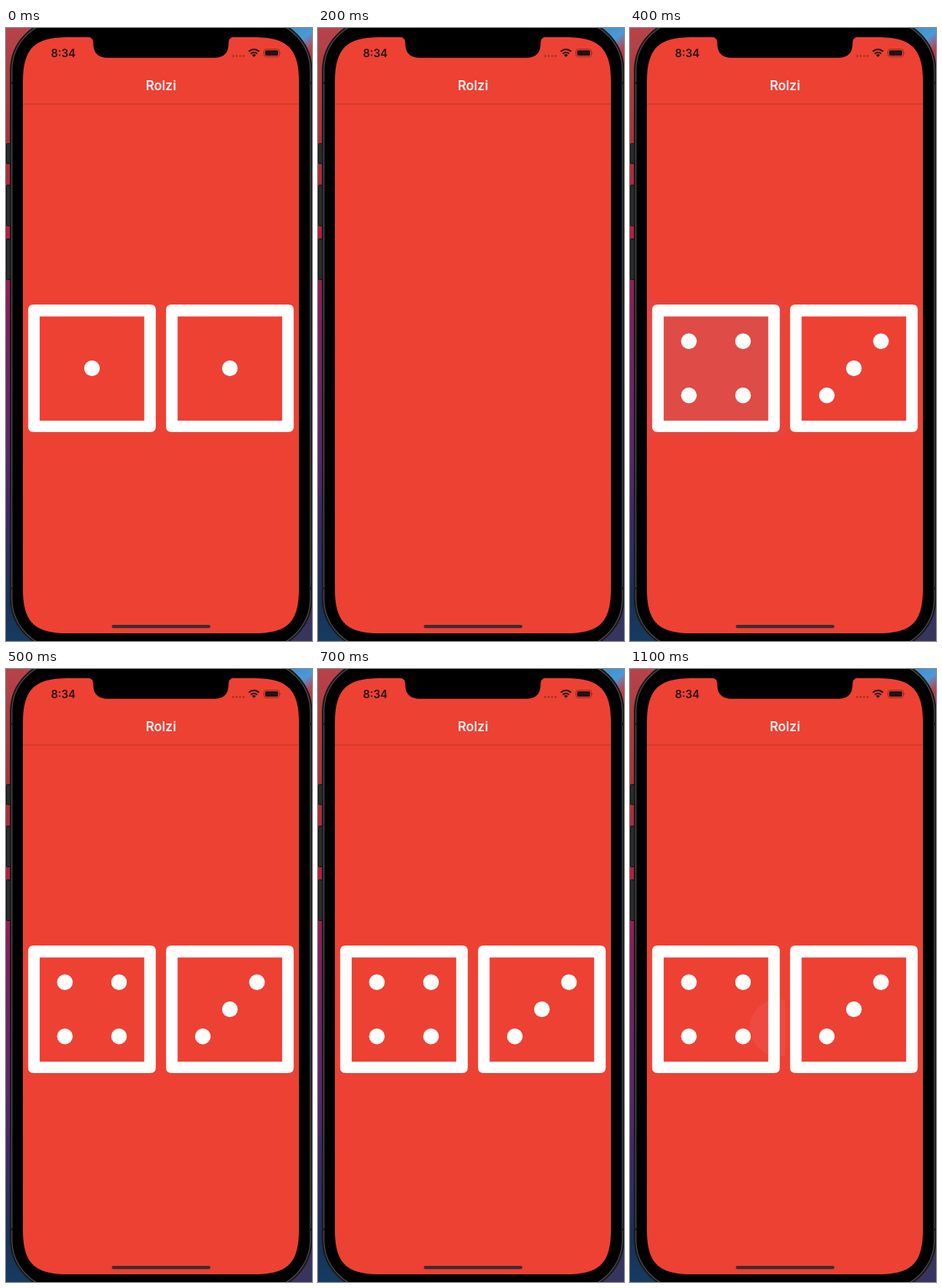
An HTML page for the animation above (1.2 s loop, 398 by 798 pixels).

```html
<!DOCTYPE html>
<html lang="en">
<head>
<meta charset="utf-8">
<title>Dice roller</title>
<style>
  html, body { margin: 0; width: 100%; height: 100%; overflow: hidden; background: #000; }
  svg { display: block; width: 398px; height: 798px; }
  text { font-family: Inter, "Liberation Sans", sans-serif; font-weight: 600; text-anchor: middle; }
</style>
</head>
<body>
<svg viewBox="0 0 398 798">
  <defs>
    <linearGradient id="wall" x2="0" y2="1">
      <stop offset="0" stop-color="#b8434b"/>
      <stop offset=".1" stop-color="#a93b3b"/>
      <stop offset=".2" stop-color="#a8303a"/>
      <stop offset=".34" stop-color="#b01f3b"/>
      <stop offset=".45" stop-color="#851f59"/>
      <stop offset=".68" stop-color="#5b2769"/>
      <stop offset=".82" stop-color="#372a60"/>
      <stop offset=".93" stop-color="#1c3059"/>
      <stop offset="1" stop-color="#153b60"/>
    </linearGradient>
    <linearGradient id="sky" x2=".6" y2="1">
      <stop offset="0" stop-color="#3a86c4"/>
      <stop offset=".5" stop-color="#4a9ad8"/>
      <stop offset=".72" stop-color="#b5485c"/>
      <stop offset="1" stop-color="#b02c3c"/>
    </linearGradient>
    <clipPath id="tapArea"><rect x="22" y="353" width="180" height="180"/></clipPath>
  </defs>

  <!-- wallpaper and phone body -->
  <rect width="398" height="798" fill="url(#wall)"/>
  <rect x="350" width="48" height="60" fill="url(#sky)"/>
  <rect x="350" y="730" width="48" height="68" fill="#37345f"/>
  <g id="keys" fill="#2b2a2c" stroke="#111"></g>
  <rect x="6" y="-11.5" width="391.5" height="821" rx="67" fill="#000" stroke="#1b1a1c" stroke-width="2"/>
  <rect x="7.7" y="-9.8" width="388.1" height="817.6" rx="65.3" fill="none" stroke="#4c4a4c" stroke-width="1.3"/>
  <path d="M5 71.5h4M394 71.5h4M5 729.5h4M394 729.5h4" stroke="#1a1a1b" stroke-width="3"/>

  <!-- screen with continuous corners -->
  <path fill="#ed4133" d="M80 12H323C366.200 12 381 26.800 381 70V730C381 773.200 366.200 788 323 788H80C36.800 788 22 773.200 22 730V70C22 26.800 36.800 12 80 12Z"/>
  <path d="M22 99h359" stroke="#cf392e" stroke-width="1.6"/>
  <path d="M106 11.5Q113.5 12 113.5 19V21Q114 38.700 132 38.700H271Q289 38.700 289.500 21V19Q289.500 12 297 11.500Z"/>

  <!-- status bar -->
  <g fill="#25100f">
    <text x="74.5" y="37.500" font-size="14.200">8:34</text>
    <g id="signal" opacity=".3"></g>
    <path d="M322.500 37.800L319.900 35.200Q322.500 33 325.100 35.200Z"/>
    <g fill="none" stroke="#25100f" stroke-width="1.9">
      <path d="M318.300 33.400Q322.500 29.900 326.700 33.400M315.700 30.600Q322.500 25 329.300 30.600"/>
    </g>
    <rect x="335.500" y="27.500" width="20" height="10" rx="3" fill="none" stroke="#25100f" stroke-opacity=".45"/>
    <rect x="337" y="29" width="17" height="7" rx="1.700"/>
    <path d="M356.700 30.800q1.500 1.700 0 3.400z" opacity=".6"/>
  </g>
  <text x="201.500" y="81" font-size="17" fill="#fff5f3">Rolzi</text>

  <!-- touch feedback -->
  <g id="press">
    <rect x="22" y="353" width="180" height="180" rx="2"/>
    <rect x="43" y="375" width="138" height="137"/>
  </g>
  <g id="splash" clip-path="url(#tapArea)">
    <circle cx="193" cy="467" r="37" fill="#ee4a40"/>
  </g>

  <g id="dice" fill="#fff"></g>
  <rect x="137.500" y="777" width="128.500" height="4.200" rx="2.100" fill="#3c2c31"/>
</svg>
<script>
const NS = 'http://www.w3.org/2000/svg';
const $ = id => document.getElementById(id);

function add(parent, tag, attrs) {
  const el = document.createElementNS(NS, tag);
  for (const key in attrs) el.setAttribute(key, attrs[key]);
  return parent.appendChild(el);
}

for (const [y, height] of [[150.5, 26], [204.5, 53], [274.5, 53]])
  add($('keys'), 'rect', { x: 0.5, y, width: 8, height, rx: 1 });
for (let i = 0; i < 4; i++)
  add($('signal'), 'circle', { cx: 295.5 + i * 4.5, cy: 36.5, r: 1.4 });

// Pip positions in steps from the die centre
const PIPS = {
  1: [[0, 0]],
  3: [[1, -1], [0, 0], [-1, 1]],
  4: [[-1, -1], [1, -1], [-1, 1], [1, 1]]
};

function makeDie(x, value) {
  const die = add($('dice'), 'g', { transform: `translate(${x} 443)` });
  add(die, 'path', {
    'fill-rule': 'evenodd',
    d: 'M-76-83H76Q83-83 83-76V76Q83 83 76 83H-76Q-83 83-83 76V-76Q-83-83-76-83Z' +
       'M-68-67.500V68.200H68V-67.500Z'
  });
  for (const [px, py] of PIPS[value])
    add(die, 'circle', { cx: px * 35.2, cy: py * 35.2, r: 10.2 });
  return die;
}

const makePair = (left, right) => [makeDie(111.8, left), makeDie(291.2, right)];
const pairs = { ones: makePair(1, 1), rolled: makePair(4, 3) };

const LOOP = 1200;
// Start time, visible pair, press colours (outer, inner), splash
const STEPS = [
  { at: 0, pair: 'ones' },
  { at: 200 },
  { at: 300, pair: 'rolled', press: ['#de4744', '#d84d50'] },
  { at: 400, pair: 'rolled', press: ['#e7453c', '#df4b47'] },
  { at: 500, pair: 'rolled' },
  { at: 1100, pair: 'rolled', splash: true }
];

const show = (el, on) => { el.style.display = on ? '' : 'none'; };
let current;

function draw(time) {
  const step = STEPS.findLast(s => s.at <= time);
  if (step === current) return;
  current = step;
  for (const name in pairs)
    pairs[name].forEach(die => show(die, name === step.pair));
  show($('press'), step.press);
  show($('splash'), step.splash);
  if (step.press)
    step.press.forEach((color, i) => $('press').children[i].setAttribute('fill', color));
}

const start = performance.now();
function tick() {
  draw((performance.now() - start) % LOOP);
  requestAnimationFrame(tick);
}
tick();
</script>
</body>
</html>
```
